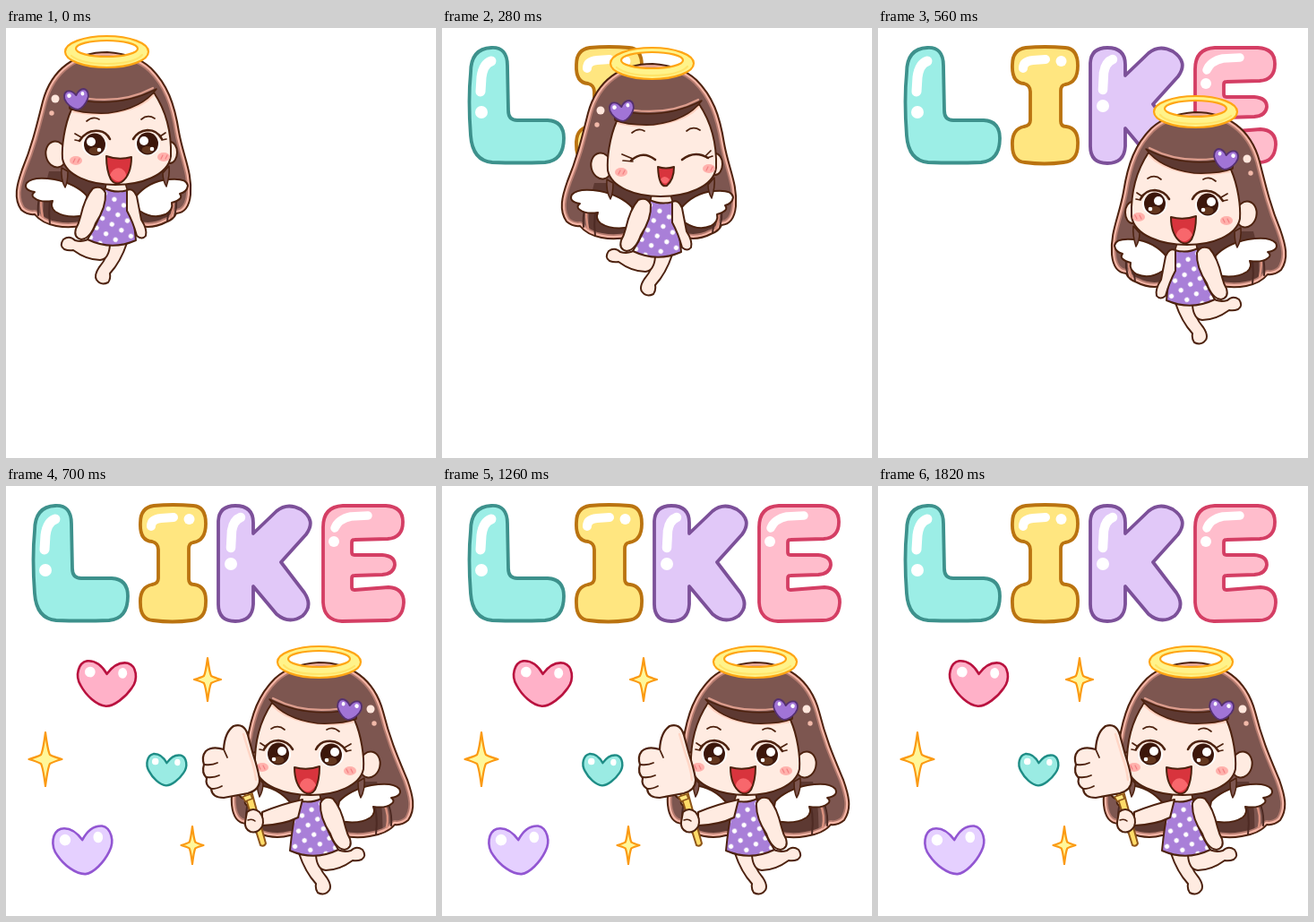
These frames come from a looping animation (480x480 px, 1960 ms). An HTML page:

```html
<!DOCTYPE html>
<html lang="en">
<head>
<meta charset="utf-8">
<title>Like</title>
<style>
html, body { margin: 0; width: 100%; height: 100%; overflow: hidden; background: #fff; }
svg { display: block; width: 100%; height: 100%; }
</style>
</head>
<body>
<svg id="stage" viewBox="0 0 480 480" stroke-linejoin="round" stroke-linecap="round"></svg>
<script>
const INK = '#4d220f', SKIN = '#ffebe1', BROWN = '#7d5650', DARK = '#5d3932';
const stage = document.getElementById('stage');

const path = (d, fill = 'none', stroke = 'none', width = 2, more = '') =>
  `<path d="${d}" fill="${fill}" stroke="${stroke}" stroke-width="${width}" ${more}/>`;
const oval = (x, y, rx, ry, fill, more = '') =>
  `<ellipse cx="${x}" cy="${y}" rx="${rx}" ry="${ry}" fill="${fill}" ${more}/>`;
const group = (id, body, more = '') => `<g id="${id}" ${more}>${body}</g>`;
const line = (d, color = INK, width = 2) => path(d, 'none', color, width);
const about = (x, y, scale) => `translate(${x} ${y}) scale(${scale}) translate(${-x} ${-y})`;

// Heart of width w and height h, centred on x, y
function heart(x, y, w, h, turn, fill, ink, width, shine) {
  const a = w / 2, b = h / 2;
  const at = (u, v) => `${a * u} ${b * v}`;
  const d = `M${at(0, -.45)} C${at(.2, -.85)} ${at(.45, -1.02)} ${at(.7, -.98)}
    C${at(1, -.88)} ${at(1.1, -.3)} ${at(.88, .12)} C${at(.68, .55)} ${at(.3, .98)} ${at(.03, .99)}
    C${at(-.3, .98)} ${at(-.68, .55)} ${at(-.88, .12)} C${at(-1.1, -.3)} ${at(-1, -.88)} ${at(-.7, -.98)}
    C${at(-.45, -1.02)} ${at(-.2, -.85)} ${at(0, -.45)}Z`;
  return `<g transform="translate(${x} ${y}) rotate(${turn})">${path(d, fill, ink, width)}
    ${oval(-a * .58, -b * .5, a * shine, a * shine, '#fff')}${oval(a * .54, -b * .52, a * shine * .85, a * shine, '#fff')}</g>`;
}

function star(x, y, rx, ry) {
  const p = rx * .27, c = p * .55;
  const d = `M${x} ${y - ry} Q${x + c} ${y - p * 1.8} ${x + p} ${y - p} Q${x + p * 1.8} ${y - c} ${x + rx} ${y}
    Q${x + p * 1.8} ${y + c} ${x + p} ${y + p} Q${x + c} ${y + p * 1.8} ${x} ${y + ry}
    Q${x - c} ${y + p * 1.8} ${x - p} ${y + p} Q${x - p * 1.8} ${y + c} ${x - rx} ${y}
    Q${x - p * 1.8} ${y - c} ${x - p} ${y - p} Q${x - c} ${y - p * 1.8} ${x} ${y - ry}Z`;
  return path(d, '#fff79a', '#fb9a12', 2.2);
}

const letters = [
  { x: 83, fill: '#9ceee6', ink: '#3d918c',
    d: 'M32 50 Q32 23 55 22 Q73 21 73 42 L74 92 Q74 103 84 103 L118 103 Q136 104 136 123 Q136 148 115 150 Q85 151 56 150 Q34 148 32 120 Q29 80 32 50Z',
    shine: ['M55 37 Q46 40 44 55 L43 71', 11], dot: [44, 94, 7] },
  { x: 186, fill: '#ffe680', ink: '#ba7310',
    d: 'M165 22 Q186 20 209 22 Q223 23 223 42 Q223 61 209 63 Q204 64 204 70 L204 104 Q204 110 210 110 Q224 112 223 130 Q223 149 207 150 Q186 153 164 150 Q150 149 150 131 Q149 113 163 110 Q170 109 170 103 L170 71 Q170 64 163 62 Q149 61 150 41 Q150 24 165 22Z',
    shine: ['M162 45 Q162 37 173 36 L187 35', 10], dot: [204.5, 37, 6] },
  { x: 288, fill: '#e1c8f8', ink: '#7c5099',
    d: 'M237 39 Q238 22 256 22 Q276 22 276 41 L276 53 L302 28 Q314 18 329 26 Q347 38 335 54 L307 85 L333 119 Q343 134 331 145 Q316 155 302 143 L276 112 L276 132 Q275 151 256 151 Q237 151 237 132Z',
    shine: ['M262 35 Q254 38 252 50 L251 69', 10.5], dot: [251, 87, 7] },
  { x: 399, fill: '#ffbdcc', ink: '#d43e64',
    d: 'M354 46 Q354 23 376 22 L424 22 Q443 23 443 40 Q443 58 426 59 L389 60 Q386 60 386 63 L386 74 Q386 77 389 77 L420 77 Q434 78 434 88 Q433 98 420 99 L389 100 Q386 100 386 103 L386 113 Q386 116 389 116 L427 113 Q444 114 444 130 Q443 150 425 150 L375 151 Q355 150 354 130Z',
    shine: ['M367 47 Q371 37 385 34 L404 33', 9.5], dot: [366, 62, 6] }
];

const letterArt = letters.map((l, i) => group('letter' + i,
  path(l.d, l.fill, l.ink, 3.8) + line(l.shine[0], '#fff', l.shine[1]) +
  oval(l.dot[0], l.dot[1], l.dot[2], l.dot[2], '#fff'))).join('');

const charms = [
  [112, 221, heart(112, 221, 65, 50, 3, '#ffb1c8', '#b9123f', 2.6, .18)],
  [179, 317, heart(179, 317, 44, 35, 3, '#9aebe3', '#1f8d86', 2.4, .17)],
  [86, 407, heart(86, 407, 66, 53, -4, '#e5d0ff', '#9256d2', 2.6, .19)],
  [225, 216, star(225, 216, 15, 24)],
  [44, 305, star(44, 305, 18.5, 30)],
  [208, 401, star(208, 401, 12.5, 21)]
];
const charmArt = charms.map((c, i) => group('charm' + i, c[2])).join('');

// Hair outline whose lower ends swing outwards by s
const hairPath = s => `M113 27 C78 27 51 45 41 82 C33 114 ${28 - s} 134 ${18 - s} 158 C${12 - s} 175 ${8 - s} 190 ${17 - s} 203
  Q${24 - s} 209 ${32 - s} 208 Q${40 - s} 218 56 221 Q72 224 87 220 L145 220 Q163 225 ${178 + s} 217
  Q${187 + s} 214 ${190 + s} 207 Q${204 + s} 206 ${206 + s} 186 C${208 + s} 161 ${198 + s} 144 193 116
  C188 84 180 63 162 45 Q145 29 113 27Z`;

function hair(id, s) {
  const d = hairPath(s);
  return group(id, `<clipPath id="${id}Clip"><path d="${d}"/></clipPath>` + path(d, BROWN) +
    `<g clip-path="url(#${id}Clip)">${path('M48 160 Q40 185 42 225 L184 225 Q188 185 180 160Z', DARK)}
    ${line(d, '#b47a6e', 10)}${line(d, '#f5b5a6', 6.5)}
    ${line(`M46 168 Q${34 - s} 186 ${36 - s} 209 M54 176 Q46 194 49 219 M185 170 Q${194 + s} 190 ${188 + s} 210 M176 176 Q184 196 180 216`, '#4d2a23', 2)}
    ${line(`M40 184 Q${38 - s} 198 ${41 - s} 211 M187 186 Q${188 + s} 198 ${184 + s} 212`, '#d9917f', 2.5)}</g>` +
    line(d, INK, 2));
}

const face = `M73 91 C65 109 62 133 63 146 C67 165 94 175 122 175 C150 175 181 165 184 143
  C185 114 177 90 165 72 C150 87 116 99 73 91Z`;
const dress = 'M110 179 Q122 185 136 181 Q142 205 145 237 Q118 249 91 236 Q105 214 108 197Z';
const leftWing = `M94 208 Q69 214 55 205 Q49 200 52 193 Q38 195 32 190 Q27 187 32 183 Q19 181 23 173
  Q30 165 54 169 Q78 174 90 187Z`;
const rightWing = `M144 189 Q159 171 181 169 Q202 167 203 176 Q202 183 194 185 Q199 191 185 195
  Q187 203 178 208 Q164 214 149 204Z`;

const eye = (x, y) =>
  oval(x, y + 1, 14, 12.5, '#fff') + oval(x, y, 12, 12.5, '#3c170b') + oval(x, y + 7, 6.5, 4, '#63371f') +
  oval(x - 4, y - 3, 5, 5, '#fff') + oval(x + 5, y + 6, 2.3, 2.3, '#fff');
const blush = (x, y) => oval(x, y, 7, 5, '#ffb1ac') +
  line(`M${x - 3} ${y + 2} L${x - 1} ${y - 2} M${x + 2} ${y + 2} L${x + 4} ${y - 2}`, '#f37f82', 1.2);

const openFace = eye(99, 130) + eye(158, 129) +
  line('M82 126 Q90 113 104 115 Q112 116 116 124 M142 124 Q147 115 158 114 Q169 114 174 124', INK, 2.6) +
  line('M84 122 L77 118 M82 126 L77 125 M172 121 L178 117 M174 125 L179 124', INK, 1.7) +
  path('M112 143 Q126 148 140 144 Q140 164 129 172 Q122 176 117 169 Q112 159 112 143Z', '#d8343d', INK, 2) +
  path('M116 164 Q121 154 129 157 Q134 160 134 165 Q125 178 116 164Z', '#f8676c');
const closedFace =
  line('M89 135 Q102 123 116 134 M146 134 Q160 123 175 132', INK, 2.6) +
  line('M91 133 L79 128 M91 136 L80 135 M172 130 L178 124 M174 132 L180 130', INK, 1.7) +
  path('M119 142 Q128 145 137 142 Q137 156 129 163 Q120 166 119 142Z', '#d8343d', INK, 2) +
  path('M122 156 Q126 150 132 156 Q127 165 122 156Z', '#f8676c');

const head =
  oval(56, 141, 11.5, 14.5, SKIN, `stroke="${INK}" stroke-width="2" transform="rotate(-12 56 141)"`) +
  oval(183, 139, 8, 12, SKIN, `stroke="${INK}" stroke-width="2"`) +
  path('M62 156 Q61 169 66 178 Q69 172 69 160Z M182 154 Q183 165 179 177 Q175 170 175 162Z', BROWN, INK, 1.5) +
  path(face, SKIN, INK, 2) +
  line('M75 93 C116 101 150 90 164 75', '#ffd0bf', 3) +
  path('M70 78 Q124 91 168 68 Q152 90 114 95 Q86 96 71 90Z', DARK, INK, 1.5) +
  line('M72 75 Q124 88 164 67', '#dd9d8d', 2.2) +
  line('M90 104 Q97 98 104 102 M151 102 Q158 96 166 101', INK, 1.7) +
  blush(78, 148) + blush(176, 144) +
  group('open', openFace) + group('closed', closedFace) +
  oval(55, 79, 4.5, 4.5, '#ffe6dc') + oval(51, 95, 2.7, 2.7, '#f2b9a9') +
  heart(79, 80, 27, 22, -8, '#a174d6', '#553070', 1.8, .17) +
  path('M66 26.5 A46.5 17.5 0 1 0 159 26.5 A46.5 17.5 0 1 0 66 26.5Z M78 23 A34.5 9 0 1 1 147 23 A34.5 9 0 1 1 78 23Z',
    '#fff38a', '#ffa514', 2.2, 'fill-rule="evenodd"') +
  line('M73 31 Q84 40 112 40 Q143 40 152 30', '#ffe468', 2.2);

const body =
  path('M116 238 Q114 256 104 267 Q98 276 101 281 Q106 288 114 284 Q117 280 116 274 Q128 261 135 240Z', SKIN, INK, 2) +
  path('M95 233 Q88 240 77 237 Q71 231 64 236 Q59 243 65 247 Q70 249 75 248 Q90 259 105 259 Q115 258 116 242Z', SKIN, INK, 2) +
  path('M112 173 L110 184 Q122 189 136 183 L133 173Z', SKIN, INK, 1.5) +
  path(dress, '#a97fd8') + path(dress, 'url(#dots)', INK, 2) +
  path('M97 179 Q107 175 111 184 Q112 200 100 218 Q94 235 84 236 Q75 234 78 224 Q81 219 83 211 Q88 189 97 179Z', SKIN, INK, 2) +
  group('armDown', path('M135 181 Q142 178 146 188 L151 214 Q158 225 156 232 Q152 237 146 232 Q142 217 135 204Z', SKIN, INK, 2));

const girl = hair('calm', 0) + hair('swung', 4) +
  group('wings', path(leftWing, '#fff', INK, 2) + path(rightWing, '#fff', INK, 2)) +
  body + head;

const sign =
  path('M331 350 Q308 355 286 364 L286 379 Q310 378 326 370Z', SKIN, INK, 2) +
  path('M265 340 L273 337 L290 399 Q288 403 284 401Z', '#ffdc69', '#8e5519', 2) +
  path('M269 364 Q276 358 283 364 Q289 371 286 380 Q281 388 273 386 Q266 383 267 375Z', SKIN, INK, 2) +
  line('M270 373 Q275 371 278 374', INK, 1.5) +
  path(`M243 294 Q244 275 254 268 Q266 264 270 278 L276 300 Q281 315 283 327 Q284 339 270 343
    L243 348 Q230 348 229 338 Q222 334 224 326 Q218 320 221 311 Q218 302 223 296 Q230 290 243 294Z`, '#ffece3', INK, 2.2) +
  line('M243 294 L247 303 M222 311 Q230 312 236 309 M224 325 Q232 326 238 323 M229 338 Q236 338 241 335', INK, 1.8) +
  line('M265 277 L272 300 Q278 316 279 328', '#ffd6c6', 2.5) +
  path('M264 347 L273 344 L275 349 L267 352Z', '#ffe680', '#8e5519', 1.5);

stage.innerHTML = `<defs>
  <pattern id="dots" width="12.5" height="12.5" patternUnits="userSpaceOnUse" patternTransform="translate(119 183) rotate(32)">
    <circle cx="6" cy="6" r="2.6" fill="#fff"/></pattern></defs>` +
  letterArt + group('charms', charmArt) + group('girl', girl) + group('sign', sign);

const $ = id => document.getElementById(id);
const show = (id, on) => $(id).setAttribute('display', on ? 'inline' : 'none');
const move = (id, value) => $(id).setAttribute('transform', value);

const STEP = 140, LOOP = 1960;
const flight = [[0, 0], [56, 1], [122, 13], [187, 32]];

function draw(time) {
  const step = Math.floor((time % LOOP) / STEP);
  const landed = step >= 5;
  const swung = step % 2 === 1;
  const beat = landed && !swung;
  const closed = step === 2 || beat;

  letters.forEach((l, i) => {
    show('letter' + i, step > i);
    move('letter' + i, about(l.x, 86, beat ? .96 : 1));
  });
  show('charms', landed);
  charms.forEach(([x, y], i) => move('charm' + i, about(x, y, beat ? .87 : 1)));

  show('open', !closed);
  show('closed', closed);
  show('calm', !swung);
  show('swung', swung);
  show('armDown', !landed);
  show('sign', landed);
  move('wings', `translate(0 ${swung ? -5 : 0})`);

  if (landed) move('girl', 'matrix(-1 0 0 1 462 170)');
  else if (step === 4) move('girl', 'matrix(-1 0 0 1 467 67)');
  else move('girl', `translate(${flight[step]})`);
  move('sign', `rotate(${beat ? 2 : 0} 277 375)`);
}

const start = performance.now();
function tick() {
  draw(performance.now() - start);
  requestAnimationFrame(tick);
}
draw(0);
requestAnimationFrame(tick);
</script>
</body>
</html>
```
